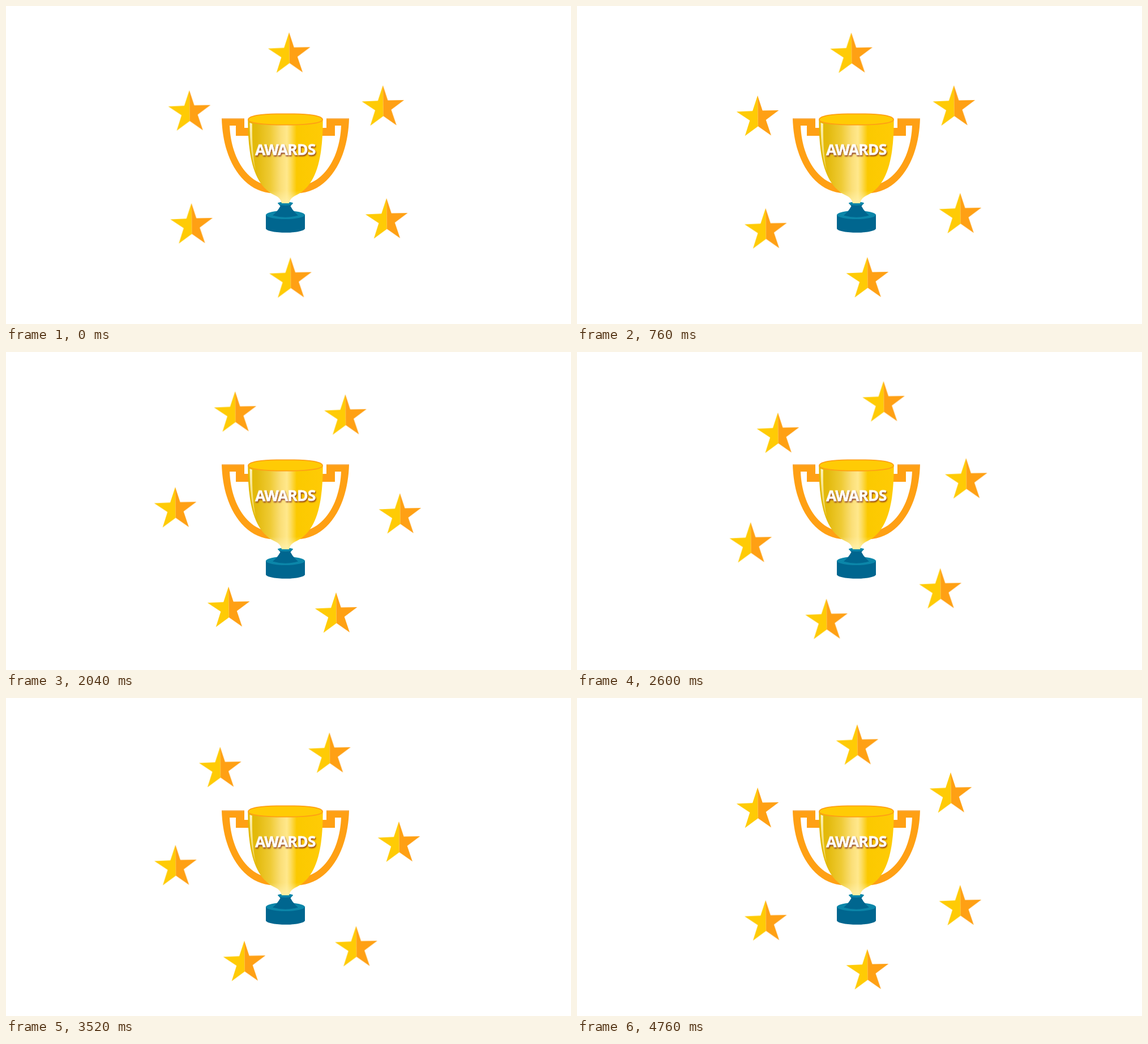
These frames come from a looping animation (998 px wide and 561 px high, 4.8 s). An HTML page:

```html
<!DOCTYPE html>
<html lang="en">
<head>
<meta charset="utf-8">
<title>Awards</title>
<style>
  html, body { margin: 0; width: 100%; height: 100%; overflow: hidden; background: #fff; }
  svg { display: block; width: 998px; height: 561px; }

  /* Upright stars on a circle; the small overshoot past a full turn is taken back at the top. */
  .star {
    animation: orbit 4800ms steps(120) infinite;
    animation-delay: calc(var(--step) * -40ms - 4ms);
  }
  @keyframes orbit {
    from { transform: translate(497.3px, 245px) rotate(.8deg) translateY(-198.5px) rotate(-.8deg); }
    to   { transform: translate(497.3px, 245px) rotate(362.31deg) translateY(-198.5px) rotate(-362.31deg); }
  }

  .label {
    font: 700 26.5px "Open Sans", "Noto Sans", sans-serif;
    font-kerning: normal;
    letter-spacing: -.9px;
    fill: #fff;
    stroke: #fff;
    stroke-width: .6px;
    filter: drop-shadow(1.8px 2px .8px rgba(120, 30, 20, .85));
  }
</style>
</head>
<body>
<svg viewBox="0 0 998 561">
  <defs>
    <linearGradient id="gold">
      <stop offset="0" stop-color="#e3b800"/>
      <stop offset=".12" stop-color="#e3ba0d"/>
      <stop offset=".3" stop-color="#efcb35"/>
      <stop offset=".44" stop-color="#fbdf78"/>
      <stop offset=".52" stop-color="#ffe88c"/>
      <stop offset=".57" stop-color="#fddd60"/>
      <stop offset=".65" stop-color="#fbc900"/>
      <stop offset="1" stop-color="#ffcb05"/>
    </linearGradient>
    <linearGradient id="neck" x2="0" y2="1">
      <stop offset=".85" stop-color="#fff3b0" stop-opacity="0"/>
      <stop offset="1" stop-color="#fff3b0" stop-opacity=".8"/>
    </linearGradient>
    <linearGradient id="sheen" x2="0" y2="1">
      <stop offset="0" stop-color="#fff6c8" stop-opacity=".95"/>
      <stop offset="1" stop-color="#fff0a8" stop-opacity=".4"/>
    </linearGradient>
    <g id="star">
      <path fill="#ffcb05" d="M0 0L-8.9 27.3L-37.2 28.6L-13.7 44.1L-22.3 71.2L.8 54.2Z"/>
      <path fill="#ffa014" d="M0 0L8.7 26.6L37.4 26L14.7 43.1L24 70.6L.8 54.2Z"/>
    </g>
    <g id="handle">
      <path fill="#ffa014" d="M381 198.5H421V215H430V229H406V211H395C397 262 420 303 455 314.500L472 330.500C418 328 383 272 381 198.500Z"/>
      <path fill="#f7a640" d="M381 198.500H421V200H381Z"/>
    </g>
    <path id="cup" d="M427.300 200C427.300 262 436 315 474 333.500C481 336.500 486 341 487 348H500C501 341 506 336.500 513 333.500C551 315 559.700 262 559.700 200Z"/>
  </defs>

  <g class="trophy">
    <use href="#handle"/>
    <use href="#handle" transform="translate(987 0) scale(-1 1)"/>

    <path fill="#00668f" d="M459 368V393C464 402 523 402 528 393V368Z"/>
    <ellipse cx="493.500" cy="368.500" rx="34.500" ry="7.500" fill="#0b86a9"/>
    <path fill="#00668f" d="M480 347.500L484.500 353Q480 362 471 369.500Q493.500 376 516 369.500Q507 362 502.500 353L507 347.500Z"/>
    <path fill="#0b86a9" d="M480 348C480 344.500 507 344.500 507 348L504.500 350.500Q493.500 353 482.500 350.500Z"/>

    <use href="#cup" fill="url(#gold)"/>
    <use href="#cup" fill="url(#neck)"/>
    <path fill="url(#sheen)" d="M430.500 206L434.800 207.500C434.500 237 436 264 441 291C433 268 430.500 237 430.500 206Z"/>
    <path fill="#ffcb05" stroke="#ffa014" stroke-width="1.800" d="M428 200.500C428 194 452 190.300 478 190.300H509C535 190.300 559 194 559 200.500C559 206.500 532 209.700 493.500 209.700C455 209.700 428 206.500 428 200.500Z"/>
    <text class="label" x="493.200" y="262.500" text-anchor="middle" transform="rotate(-.4 494 253)">AWARDS</text>
  </g>

  <g class="stars">
    <use class="star" href="#star" style="--step: 0"/>
    <use class="star" href="#star" style="--step: 19"/>
    <use class="star" href="#star" style="--step: 39"/>
    <use class="star" href="#star" style="--step: 59"/>
    <use class="star" href="#star" style="--step: 79"/>
    <use class="star" href="#star" style="--step: 99"/>
  </g>
</svg>
</body>
</html>
```
